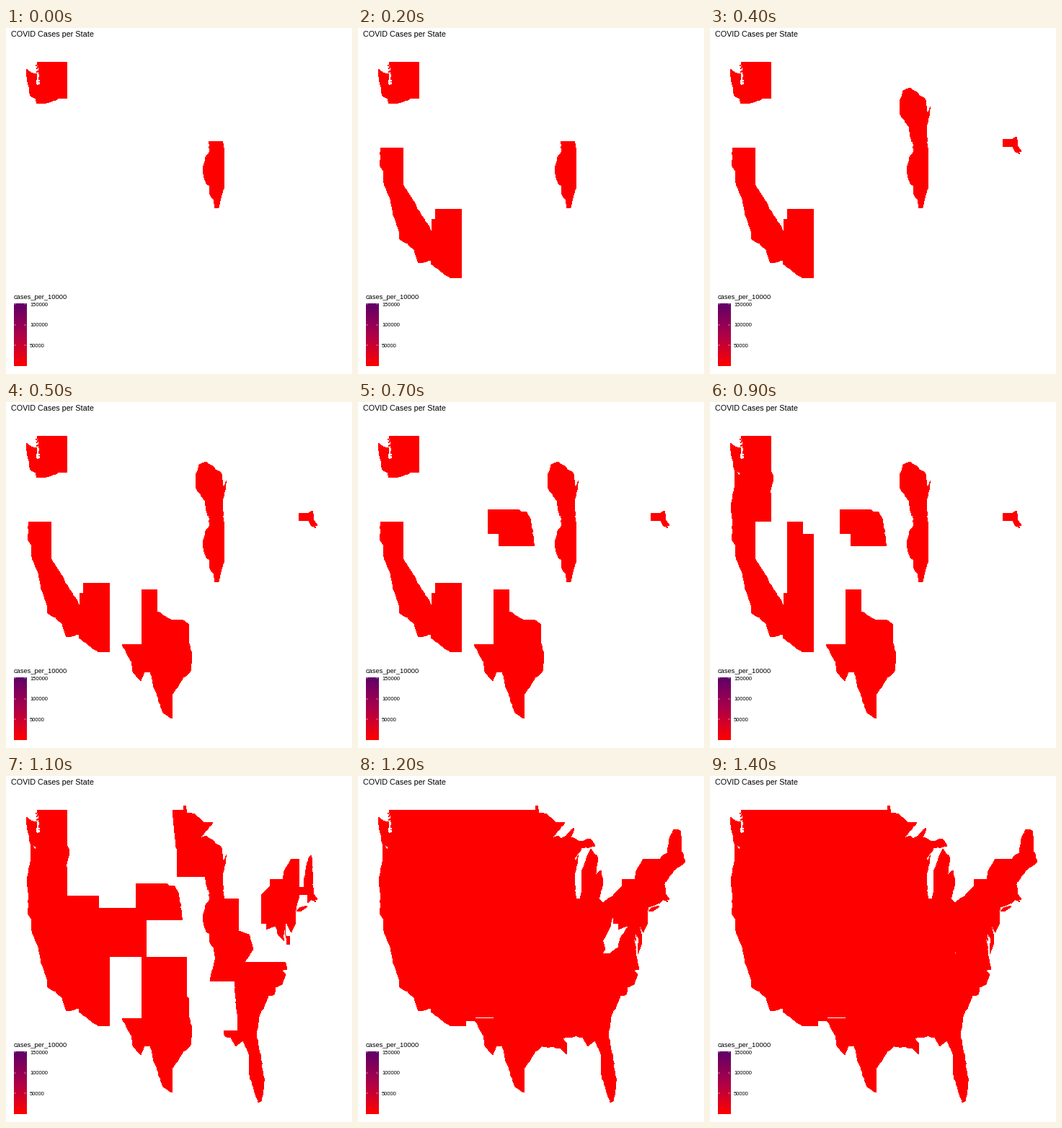
A matplotlib script for the animation above (10000 ms loop, 480 by 480 pixels).

```python
import matplotlib.pyplot as plt
import numpy as np
from matplotlib.animation import FuncAnimation
from matplotlib.colors import LinearSegmentedColormap
from matplotlib.patches import Polygon

SIZE, STEP, LOOP = 480, 100, 10000
RED = "#ff0000"
FONT = "Liberation Sans"

rng = np.random.default_rng(7)
fig = plt.figure(figsize=(4.8, 4.8), dpi=100, facecolor="white")
ax = fig.add_axes([0, 0, 1, 1])
ax.axis("off")

parts = []  # (time of first appearance in ms, patch)


def ragged(pts, rough=0.7, spacing=4):
    """Break slanted edges into short uneven pieces; keep surveyed lines straight."""
    out = []
    for a, b in zip(pts, pts[1:] + pts[:1]):
        a, b = np.array(a, float), np.array(b, float)
        out.append(a)
        if np.abs(b - a).min() < 1.5:
            continue
        n = int(np.hypot(*(b - a)) // spacing)
        for k in range(1, n):
            out.append(a + (b - a) * k / n + rng.uniform(-rough, rough, 2))
    return out


def land(start, *pts, color=RED):
    patch = Polygon(ragged(list(pts)), closed=True, facecolor=color,
                    edgecolor="none", linewidth=0, antialiased=False)
    ax.add_patch(patch)
    parts.append((start, patch))


def box(start, x0, y0, x1, y1, color=RED):
    land(start, (x0, y0), (x1, y0), (x1, y1), (x0, y1), color=color)


def specks(start, n, x0, y0, x1, y1, color=RED):
    for x, y in rng.integers((x0, y0), (x1, y1), (n, 2)):
        box(start, x, y, x + 1.5, y + 1.5, color)


def label(x, y, text, px):
    ax.text(x, y, text, fontsize=px * 0.72, family=FONT, color="black",
            va="baseline", ha="left")


# Washington with the Sound
land(0, (43, 47), (85, 47), (85, 98), (72, 98), (60, 103), (43, 105),
     (41, 98), (34, 94), (28, 64), (28, 57), (35, 62), (43, 64), (41, 78),
     (45, 80), (46, 56))
specks(0, 5, 40, 51, 44, 63)
specks(0, 6, 43, 62, 46, 78, "white")

# Illinois
land(0, (281, 157), (300, 157), (303, 172), (303, 217), (299, 232),
     (295, 249), (290, 250), (288, 238), (282, 229), (283, 219), (278, 216),
     (273, 197), (277, 179), (283, 171))

# California, Arizona
land(200, (32, 166), (63, 166), (63, 218), (102, 283), (104, 290),
     (101, 300), (102, 322), (84, 326), (78, 308), (69, 299), (58, 293),
     (57, 282), (49, 260), (44, 235), (36, 215), (35, 198), (30, 190))
land(200, (107, 251), (144, 251), (143, 347), (129, 347), (101, 327),
     (101, 300), (104, 290), (102, 283), (102, 266), (107, 265))

# Massachusetts, Wisconsin
land(400, (407, 154), (420, 154), (425, 151), (427, 164), (432, 171),
     (425, 173), (420, 165), (406, 165))
specks(400, 3, 426, 165, 432, 178)
land(400, (263, 103), (268, 87), (278, 83), (299, 100), (301, 121),
     (306, 109), (300, 142), (302, 158), (280, 158), (276, 137), (264, 120))

# Texas
land(500, (188, 260), (210, 260), (210, 291), (229, 302), (246, 303),
     (253, 308), (254, 335), (258, 352), (256, 373), (246, 382), (231, 405),
     (231, 439), (218, 431), (207, 400), (200, 375), (192, 374), (187, 387),
     (177, 376), (174, 360), (161, 336), (188, 336))

# Nebraska
land(700, (180, 149), (222, 149), (226, 152), (234, 153), (239, 162),
     (245, 200), (195, 200), (195, 183), (180, 183))

# Oregon, Utah
land(900, (35, 95), (43, 104), (60, 103), (72, 98), (85, 97), (88, 104),
     (83, 124), (85, 128), (85, 166), (32, 166), (29, 150), (34, 115))
land(900, (107, 166), (129, 166), (129, 183), (144, 183), (144, 251),
     (107, 251))

# Nevada, Colorado, Oklahoma
land(1100, (62, 166), (107, 166), (107, 268), (100, 283), (60, 216))
box(1100, 143, 183, 195, 251)
box(1100, 188, 251, 251, 262)
box(1100, 209, 251, 251, 308)

# Minnesota
land(1100, (231, 47), (246, 47), (246, 41), (249, 41), (251, 51), (262, 53),
     (274, 64), (287, 64), (269, 86), (264, 104), (265, 120), (277, 140),
     (237, 140), (237, 105))

# Indiana down to Florida
land(1100, (302, 170), (323, 170), (323, 215), (337, 220), (343, 241),
     (331, 258), (387, 258), (390, 268), (382, 270), (388, 275), (383, 289),
     (374, 293), (372, 303), (364, 305), (351, 334), (347, 358), (354, 395),
     (358, 424), (355, 450), (350, 453), (338, 415), (337, 386), (329, 367),
     (319, 375), (312, 363), (304, 361), (302, 353), (321, 353), (321, 330),
     (317, 285), (283, 285), (291, 250), (298, 228))

# Pennsylvania, New York, New Jersey, Long Island
land(1100, (354, 166), (366, 153), (366, 144), (384, 143), (386, 132),
     (396, 115), (407, 115), (407, 166), (402, 186), (402, 203), (396, 217),
     (390, 205), (354, 205))
land(1100, (403, 188), (407, 183), (418, 180), (408, 188))

# Maryland on both sides of the bay
land(1100, (361, 205), (388, 205), (384, 222), (386, 229), (379, 222),
     (374, 208), (361, 213))
land(1100, (387, 206), (388, 222), (394, 223), (393, 234), (389, 233))

# New Hampshire, Rhode Island
land(1100, (423, 110), (426, 148), (423, 153), (413, 154), (416, 130),
     (420, 114))
land(1100, (418, 165), (422, 165), (423, 172), (419, 176))

# Remaining west, plains and Gulf states, overlapping their neighbours
box(1200, 84, 47, 238, 184)
box(1200, 143, 139, 296, 335)
box(1200, 143, 330, 163, 340)
box(1200, 142, 335, 150, 347)
land(1200, (250, 330), (285, 283), (323, 283), (323, 354), (304, 354),
     (304, 361), (284, 364), (290, 372), (290, 386), (280, 377), (256, 375))

# Michigan, both peninsulas
land(1200, (270, 90), (280, 88), (289, 83), (300, 72), (295, 85), (309, 91),
     (322, 87), (329, 97), (310, 100), (302, 113), (292, 98))
land(1200, (308, 171), (311, 157), (310, 133), (323, 101), (333, 114),
     (329, 138), (337, 131), (340, 147), (333, 172))

# Ohio
land(1200, (321, 169), (333, 170), (340, 176), (356, 165), (355, 190),
     (350, 209), (339, 230), (321, 218))

# Virginia, its eastern shore, Delaware
land(1200, (328, 260), (337, 246), (349, 247), (361, 238), (364, 225),
     (375, 209), (384, 232), (386, 250), (388, 260))
land(1200, (389, 232), (393, 233), (388, 247))
land(1200, (386, 205), (390, 205), (394, 223), (387, 223))

# Connecticut, Vermont, Maine
land(1200, (405, 165), (419, 165), (419, 176), (403, 182))
land(1200, (406, 115), (421, 115), (416, 154), (406, 154))
land(1200, (422, 111), (429, 107), (433, 84), (438, 74), (447, 76),
     (449, 105), (454, 119), (438, 131), (427, 147))

# West Virginia
land(1400, (354, 187), (356, 204), (362, 204), (376, 208), (365, 226),
     (362, 239), (349, 248), (338, 243), (338, 228), (349, 208))

# Title and legend
label(7, 12, "COVID Cases per State", 10.8)
label(11, 376.5, "cases_per_10000", 9.25)
ramp = LinearSegmentedColormap.from_list(
    "cases", ["#600068", "#ad0049", RED])
ax.imshow(np.linspace(0, 1, 87)[:, None], cmap=ramp, aspect="auto",
          extent=(11, 28.5, 469, 382.5), interpolation="nearest")
for k in (1, 2, 3):
    y = 469 - 28.6 * k
    for x in (11, 25):
        ax.plot([x, x + 3.4], [y, y], color="white", lw=0.35,
                solid_capstyle="butt")
    label(33, y + 2.7, str(50000 * k), 7.6)

ax.set_xlim(0, SIZE)
ax.set_ylim(SIZE, 0)


def update(i):
    now = i * STEP
    for start, patch in parts:
        patch.set_visible(start <= now)
    return [patch for _, patch in parts]


anim = FuncAnimation(fig, update, frames=LOOP // STEP, interval=STEP,
                     repeat=True, repeat_delay=0, blit=False)
plt.show()
```
